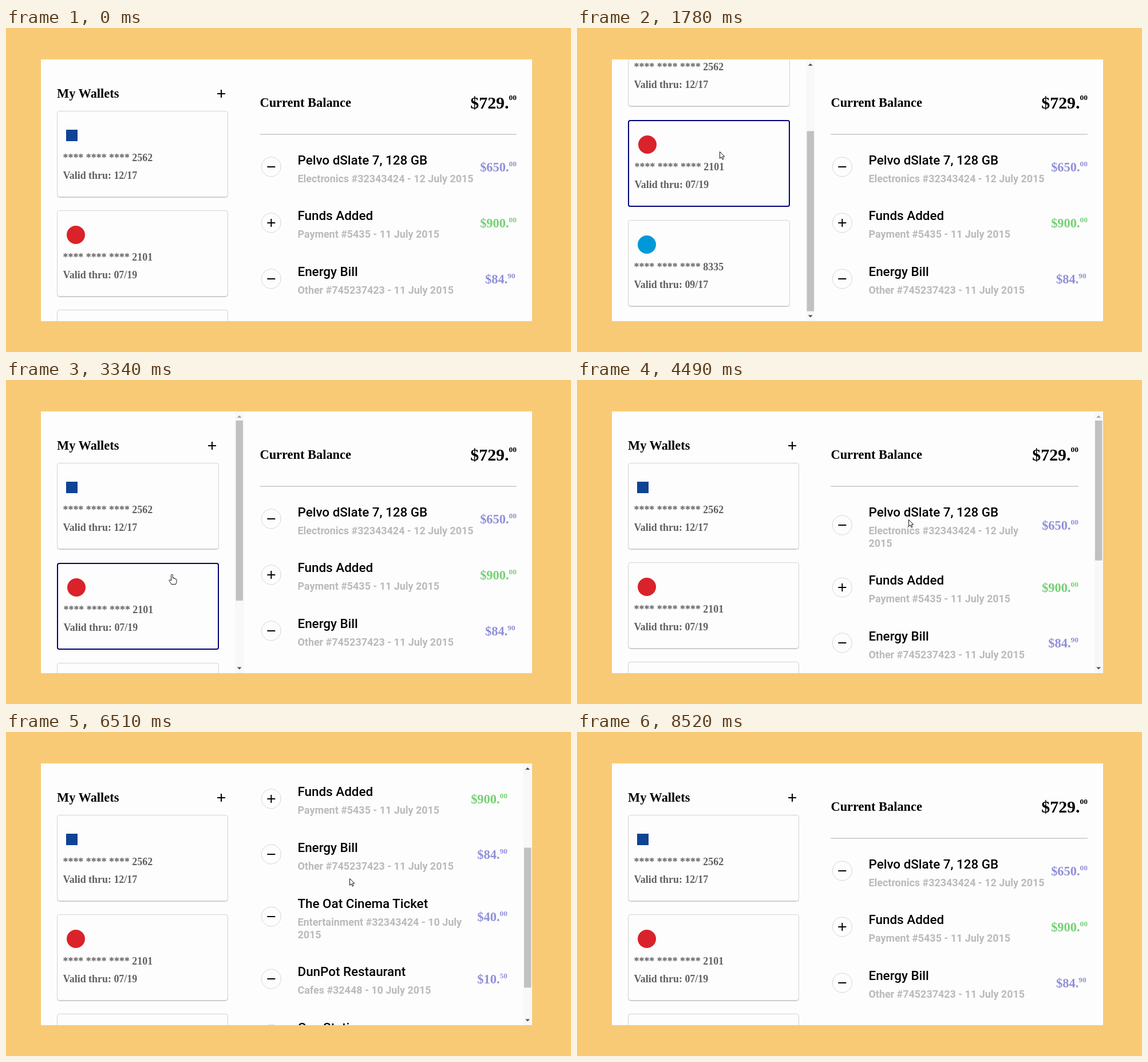
Recreate the animation shown at these times as an HTML page. Size 987x567 px, loop 9.06 s.

```html
<!DOCTYPE html>
<html lang="en">
<head>
<meta charset="utf-8">
<title>Wallets</title>
<style>
  html, body { margin: 0; width: 100%; height: 100%; overflow: hidden; background: #f8ca76; }
  svg { display: block; width: 987px; height: 567px; }
  text { white-space: pre; }
  .serif { font-family: "Liberation Serif", Times, serif; font-weight: 700; }
  .sans { font-family: Roboto, sans-serif; font-weight: 500; }
  .head { font-size: 22.4px; }
  .card { font-size: 17.92px; fill: #606060; }
  .note { font-size: 17.92px; font-weight: 700; fill: #bababa; }
  .sup { font-size: 13.44px; }
  .icon { stroke: #000; stroke-width: 2; fill: none; }
</style>
</head>
<body>
<svg id="stage" viewBox="0 0 987 567">
  <defs><clipPath id="clip"><rect x="61" y="55" width="858" height="458"/></clipPath></defs>
  <rect x="61" y="55" width="858" height="458" fill="#fdfdfd"/>
</svg>
<script>
const LOOP = 9060, STEP = 77.44;
const MINUS = 'M-7 0H7', PLUS = 'M-7 0H7M0-7V7';
const PURPLE = '#9090d8', GREEN = '#75d075';

const CARDS = [
  { digits: '2562', valid: '12/17', logo: ['rect', { x: 105, y: 33, width: 20, height: 20, fill: '#0f4394' }] },
  { digits: '2101', valid: '07/19', logo: ['circle', { cx: 122, cy: 43, r: 16, fill: '#d9222a' }] },
  { digits: '8335', valid: '09/17', logo: ['circle', { cx: 122, cy: 43, r: 16, fill: '#0099d8' }] }
];

const ROWS = [
  { title: 'Pelvo dSlate 7, 128 GB', note: 'Electronics #32343424 - 12 July', year: true, sum: '$650.', cents: '00' },
  { title: 'Funds Added', note: 'Payment #5435 - 11 July 2015', sum: '$900.', cents: '00', plus: true },
  { title: 'Energy Bill', note: 'Other #745237423 - 11 July 2015', sum: '$84.', cents: '90' },
  { title: 'The Oat Cinema Ticket', note: 'Entertainment #32343424 - 10 July', year: true, sum: '$40.', cents: '00' },
  { title: 'DunPot Restaurant', note: 'Cafes #32448 - 10 July 2015', sum: '$10.', cents: '50' },
  { title: 'Gas Station', note: 'Other #2138453 - 10 July 2015', sum: '$30.', cents: '00' }
];

// Pointer path: step, x, y
const POINTER = [
  [1, 752, 553], [5, 540, 536], [8, 400, 519], [10, 312, 345], [11, 266, 250], [12, 249, 216],
  [23, 249, 216], [24, 251, 224], [26, 258, 245], [27, 265, 268], [29, 284, 312], [31, 290, 345],
  [32, 295, 367], [33, 298, 377], [34, 300, 384], [41, 300, 384], [42, 297, 365], [43, 290, 340],
  [44, 280, 302], [45, 283, 280], [46, 291, 256], [47, 286, 250], [48, 286, 248], [51, 286, 248],
  [58, 579, 244], [60, 579, 244], [66, 585, 239], [67, 585, 239], [70, 600, 255], [71, 600, 255],
  [72, 600, 256], [99, 600, 256], [105, 665, 415], [109, 728, 560]
];

// Scroll moves: first step, last step, from, to
const LEFT_SCROLL = [[18, 24, 0, 161], [35, 41, 161, 0]];
const RIGHT_SCROLL = [[59, 66, 0, 339], [80, 84, 339, 246], [85, 94, 246, 0]];

const stage = document.getElementById('stage');

function set(el, attrs) {
  for (const key in attrs) el.setAttribute(key, attrs[key]);
  return el;
}
function add(parent, tag, attrs = {}) {
  return parent.appendChild(set(document.createElementNS('http://www.w3.org/2000/svg', tag), attrs));
}
function write(parent, x, y, text, cls, attrs = {}) {
  const el = add(parent, 'text', { x, y, class: cls, ...attrs });
  el.textContent = text;
  return el;
}
const move = (el, x, y) => el.setAttribute('transform', `translate(${x} ${y})`);
const show = (el, on) => el.setAttribute('visibility', on ? 'visible' : 'hidden');

function price(parent, right, y, sum, cents, size, fill, lift) {
  const g = add(parent, 'g', { fill });
  const at = right - 13.44;
  write(g, at, y, sum, 'serif', { 'font-size': size, 'text-anchor': 'end' });
  write(g, at, y - lift, cents, 'serif sup');
  return g;
}

function scrollbar(parent, x, content) {
  const g = add(parent, 'g', { transform: `translate(${x} 55)` });
  add(g, 'rect', { width: 15.5, height: 458, fill: '#f8f8f8' });
  const size = 426 * 458 / content;
  const thumb = add(g, 'rect', { x: 1.5, width: 12.5, height: size, fill: '#c1c1c1' });
  const up = add(g, 'path', { d: 'M3.7 11L7.7 7L11.7 11Z' });
  const down = add(g, 'path', { d: 'M3.7 447.5L7.7 451.5L11.7 447.5Z' });
  const max = content - 458;
  return (on, pos) => {
    show(g, on);
    thumb.setAttribute('y', 16 + (426 - size) * pos / max);
    up.setAttribute('fill', pos > 0 ? '#505050' : '#a3a3a3');
    down.setAttribute('fill', pos < max ? '#505050' : '#a3a3a3');
  };
}

const panel = add(stage, 'g', { 'clip-path': 'url(#clip)' });

// Wallet list
const left = add(panel, 'g');
write(left, 89, 122, 'My Wallets', 'serif head');
const addIcon = add(left, 'path', { d: PLUS, class: 'icon' });
const cards = CARDS.map((c, i) => {
  const g = add(left, 'g');
  const shade = add(g, 'rect', { x: 89.5, y: 1.5, height: 150, rx: 4, fill: 'none', stroke: '#c8c8c8' });
  const box = add(g, 'rect', { fill: '#fdfdfd' });
  const body = add(g, 'g');
  add(body, c.logo[0], c.logo[1]);
  write(body, 99.5, 88, '**** **** **** ' + c.digits, 'serif card');
  write(body, 99.5, 119, 'Valid thru: ' + c.valid, 'serif card');
  return { g, shade, box, body, top: 145 + 174 * i };
});

// Transactions
const right = add(panel, 'g');
write(right, 443.5, 138, 'Current Balance', 'serif head');
const total = price(right, 892, 141, '$729.', '00', 29.9, '#000', 15);
const rule = add(right, 'rect', { x: 443.5, y: 185.3, height: 1.6, fill: '#cacaca' });
const rows = ROWS.map(r => {
  const mid = add(right, 'g');
  add(mid, 'circle', { cx: 463.3, r: 17, fill: 'none', stroke: '#d6d6d6' });
  add(mid, 'path', { d: r.plus ? PLUS : MINUS, class: 'icon', transform: 'translate(463.3 0)' });
  const sum = price(mid, 892, 8, r.sum, r.cents, 22.4, r.plus ? GREEN : PURPLE, 9);
  const words = add(right, 'g');
  write(words, 509.5, 8, r.title, 'sans head');
  const note = write(words, 509.5, 39, r.note, 'sans note');
  const year = r.year && write(words, 509.5, 61, '2015', 'sans note');
  return { ...r, words, mid, sum, noteEl: note, yearEl: year };
});

const leftBar = scrollbar(panel, 400, 619);
const rightBar = scrollbar(panel, 903.5, 797);

// Pointers
const ink = { fill: '#fff', stroke: '#111', 'stroke-width': 1, 'stroke-linejoin': 'round' };
const arrow = add(stage, 'path', { ...ink, d: 'M.5 .5V12.3L3.2 9.8L5.2 14L7 13.2L5.1 9H8.8Z' });
const hand = add(stage, 'path', { ...ink, d:
  'M-1.5 11V1.7a1.4 1.4 0 0 1 2.8 0V7.2a1.2 1.2 0 0 1 2.4 0v.8a1.2 1.2 0 0 1 2.3.2v.8' +
  'a1.1 1.1 0 0 1 2 .5V12.5c0 2-1 3-1.4 5H-1c-.6-2-2.5-3.5-4-6.3c-.6-1.5 1.2-2 2-1Z' });

function pointerAt(k) {
  const last = POINTER.length - 1;
  if (k < POINTER[0][0] || k > POINTER[last][0]) return null;
  let i = 0;
  while (i < last - 1 && k >= POINTER[i + 1][0]) i++;
  const [k0, x0, y0] = POINTER[i], [k1, x1, y1] = POINTER[i + 1];
  const p = (k - k0) / (k1 - k0);
  return { x: Math.round(x0 + (x1 - x0) * p), y: Math.round(y0 + (y1 - y0) * p) };
}

function scrollAt(moves, k) {
  let pos = 0;
  for (const [k0, k1, from, to] of moves) {
    if (k <= k0) break;
    const p = Math.min(1, (k - k0) / (k1 - k0));
    pos = from + (to - from) * (1 - Math.pow(1 - p, 2.5));
  }
  return Math.round(pos);
}

function drawLeft(on, pos, hit) {
  const inset = on ? 16 : 0;
  move(left, 0, -pos);
  move(addIcon, 376 - inset, 115);
  cards.forEach((c, i) => {
    const hot = i === hit;
    move(c.g, 0, c.top + (hit >= 0 && i > hit ? 2 : 0));
    move(c.body, hot ? 1 : 0, hot ? 1 : 0);
    show(c.shade, !hot);
    c.shade.setAttribute('width', 298 - inset);
    set(c.box, hot
      ? { x: 90, y: 2, width: 297 - inset, height: 150, rx: 3, stroke: '#000078', 'stroke-width': 2 }
      : { x: 89.5, y: 0.5, width: 298 - inset, height: 150, rx: 4, stroke: '#d2d2d2', 'stroke-width': 1 });
  });
  leftBar(on, pos);
}

function drawRight(on, pos) {
  const inset = on ? 16 : 0;
  move(right, 0, -pos);
  move(total, -inset, 0);
  rule.setAttribute('width', 448.5 - inset);
  let y = 230.7;
  for (const r of rows) {
    const wrap = on && r.year;
    move(r.words, 0, Math.round(y - 0.2));
    move(r.mid, 0, Math.round(y + (wrap ? 23.3 : 12.4)));
    move(r.sum, on ? -16 : r.sum.textContent.length < 7 ? -2.3 : 0, 0);
    if (r.year) {
      r.noteEl.textContent = r.note + (wrap ? '' : ' 2015');
      show(r.yearEl, wrap);
    }
    y += wrap ? 119.4 : 97.8;
  }
  rightBar(on, pos);
}

function draw(time) {
  const k = Math.floor((time % LOOP) / STEP + 0.1);
  const p = pointerAt(k);
  const inside = p && p.y >= 55 && p.y < 513;
  const onLeft = !!inside && p.x >= 61 && p.x < 415;
  const onRight = !!inside && p.x >= 415 && p.x < 919;
  const leftPos = scrollAt(LEFT_SCROLL, k);

  const hit = onLeft && p.x > 89 && p.x < 372
    ? cards.findIndex(c => p.y + leftPos >= c.top && p.y + leftPos <= c.top + 151)
    : -1;
  drawLeft(onLeft, leftPos, hit);
  drawRight(onRight, scrollAt(RIGHT_SCROLL, k));

  const grab = hit >= 0 && !(k > 18 && k < 24);
  show(arrow, !!p && !grab);
  show(hand, !!p && grab);
  if (p) {
    move(arrow, p.x, p.y);
    move(hand, p.x, p.y);
  }
}

function tick() {
  draw(performance.now());
  requestAnimationFrame(tick);
}
tick();
</script>
</body>
</html>
```
